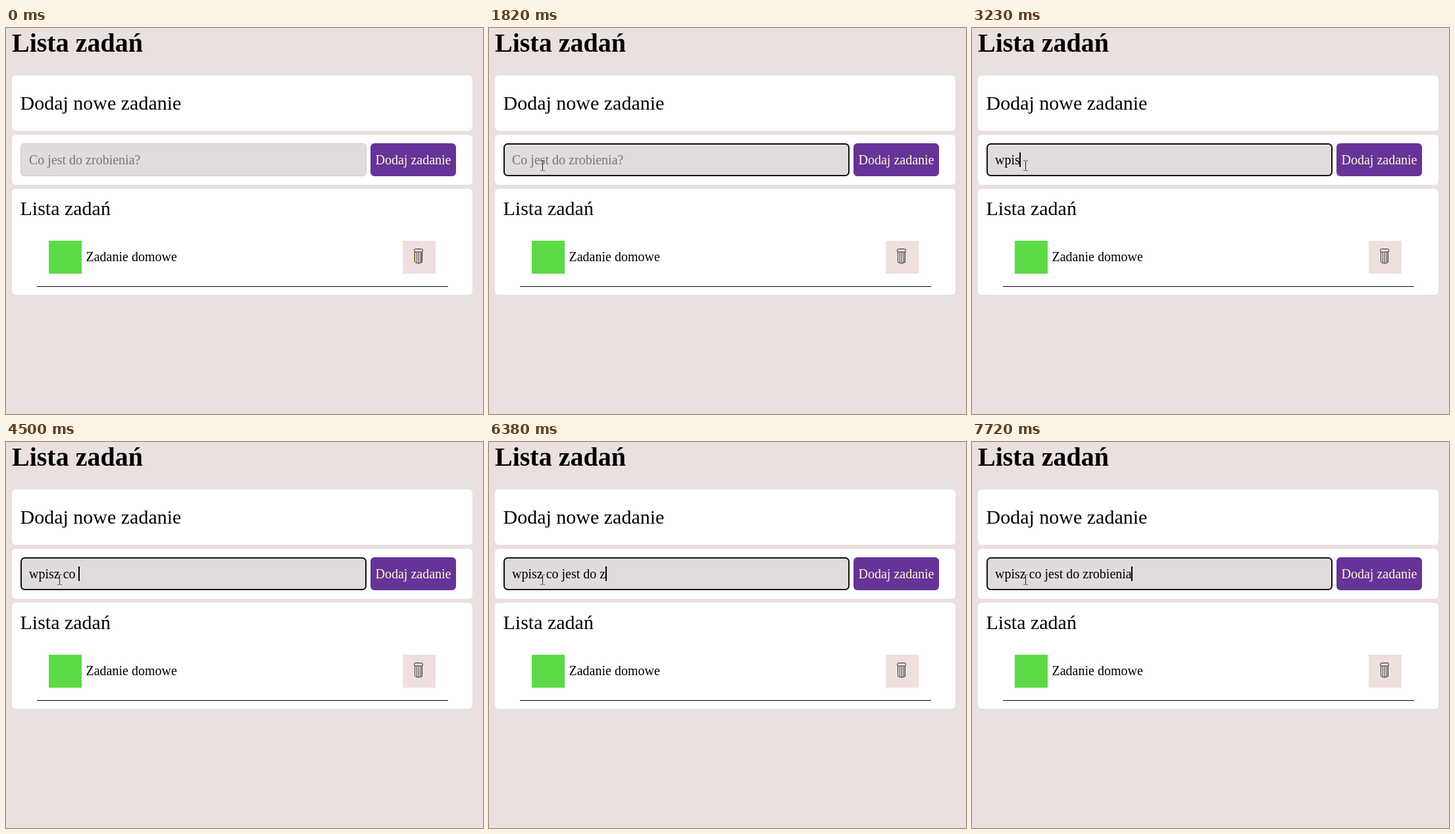
These frames come from a looping animation (725x586 px, 8 s). An HTML page:

```html
<!DOCTYPE html>
<html lang="pl">
<head>
<meta charset="utf-8">
<title>Lista zadań</title>
<style>
  html, body { margin: 0; width: 100%; height: 100%; overflow: hidden; background: #eae0df; }
  svg { display: block; font: 20px "Liberation Serif", "Times New Roman", serif; }
  .title { font-size: 40px; font-weight: bold; }
  .heading { font-size: 30px; }
  .card { fill: #fff; }
  .bin, .beam { fill: none; stroke: #222; }
  .fringe { fill: none; stroke: #d98a2b; }
  .focused .fringe, .focused #idle, svg:not(.focused) #ring { display: none; }
  .hidden { visibility: hidden; }
</style>
</head>
<body>
<svg id="stage" width="725" height="586" viewBox="0 0 725 586">
  <rect width="725" height="586" fill="#eae0df"/>
  <text class="title" x="9" y="36">Lista zadań</text>

  <rect class="card" x="9" y="72" width="700" height="84" rx="6"/>
  <text class="heading" x="21.5" y="124">Dodaj nowe zadanie</text>

  <rect class="card" x="9" y="162" width="700" height="76" rx="6"/>
  <rect x="22" y="175" width="526" height="50" rx="6" fill="#e0dcdb"/>
  <rect id="idle" x="22.5" y="175.5" width="525" height="49" rx="5.5" fill="none" stroke="#d0cccb"/>
  <rect id="ring" x="23" y="176" width="524" height="48" rx="5.5" fill="none" stroke="#101010" stroke-width="2"/>
  <text id="hint" x="35" y="207" fill="#757575">Co jest do zrobienia?</text>
  <text id="entry" x="35" y="207"></text>
  <rect id="caret" y="189" width="2" height="22"/>
  <rect x="554" y="175" width="130" height="50" rx="6" fill="#663399"/>
  <text x="561.5" y="207" fill="#fffacd">Dodaj zadanie</text>

  <rect class="card" x="9" y="244" width="700" height="161" rx="6"/>
  <text class="heading" x="21.5" y="284">Lista zadań</text>
  <rect x="65" y="323" width="50" height="50" fill="#5bda46"/>
  <text x="121.5" y="354">Zadanie domowe</text>
  <rect x="603" y="323" width="50" height="50" fill="#efdfdf"/>
  <g transform="translate(627 346)">
    <path class="bin" d="M-5.5-6V9.5Q0 13 5.5 9.5V-6M-2.5-5V10.5M.5-5V11M3.5-5V10.5" stroke-width=".9"/>
    <path class="fringe" d="M-6.3-6V9M4.6-5V9"/>
    <rect class="bin" x="-6.5" y="-10.5" width="13" height="4.5" rx="2.2"/>
  </g>
  <rect x="47" y="392" width="625" height="1"/>

  <path id="beam" class="beam" d="M-2.5-7.5H-.5M1.5-7.5H3.5M.5-7V7M-2.5 7.5H-.5M1.5 7.5H3.5"/>
</svg>
<script>
  const LOOP = 8000, FOCUS = 1290, START_X = 35;
  const phrase = "wpisz co jest do zrobienia";
  // Moment at which each character appears
  const keys = [2770, 3030, 3100, 3230, 3430, 3560, 3760, 3890, 4500, 4830, 4900, 5100, 5170,
    5300, 5920, 6050, 6120, 6380, 6580, 6710, 7040, 7170, 7370, 7570, 7570, 7720];
  const caretOff = [[0, FOCUS], [1820, 2370], [5850, 5920]];
  const path = [[790, 46, 221], [1060, 72, 212], [1280, 72, 212], [1490, 81, 209]];

  const [stage, hint, entry, caret, beam] =
    ["stage", "hint", "entry", "caret", "beam"].map(id => document.getElementById(id));
  const pen = document.createElement("canvas").getContext("2d");
  pen.font = '20px "Liberation Serif", "Times New Roman", serif';

  const hide = (el, on) => el.classList.toggle("hidden", on);

  function pointerAt(t) {
    const next = path.findIndex(p => p[0] > t);
    if (next < 1) return path[next < 0 ? path.length - 1 : 0].slice(1);
    const [a, b] = [path[next - 1], path[next]];
    const k = (t - a[0]) / (b[0] - a[0]);
    return [1, 2].map(i => Math.round(a[i] + (b[i] - a[i]) * k));
  }

  function draw() {
    const t = performance.now() % LOOP;
    const typed = phrase.slice(0, keys.filter(k => k <= t).length);
    stage.classList.toggle("focused", t >= FOCUS);
    entry.textContent = typed;
    hide(hint, typed !== "");
    caret.setAttribute("x", Math.floor(START_X + pen.measureText(typed).width));
    hide(caret, caretOff.some(([from, to]) => t >= from && t < to));
    beam.setAttribute("transform", `translate(${pointerAt(t)})`);
    hide(beam, t < path[0][0]);
    requestAnimationFrame(draw);
  }
  draw();
</script>
</body>
</html>
```
